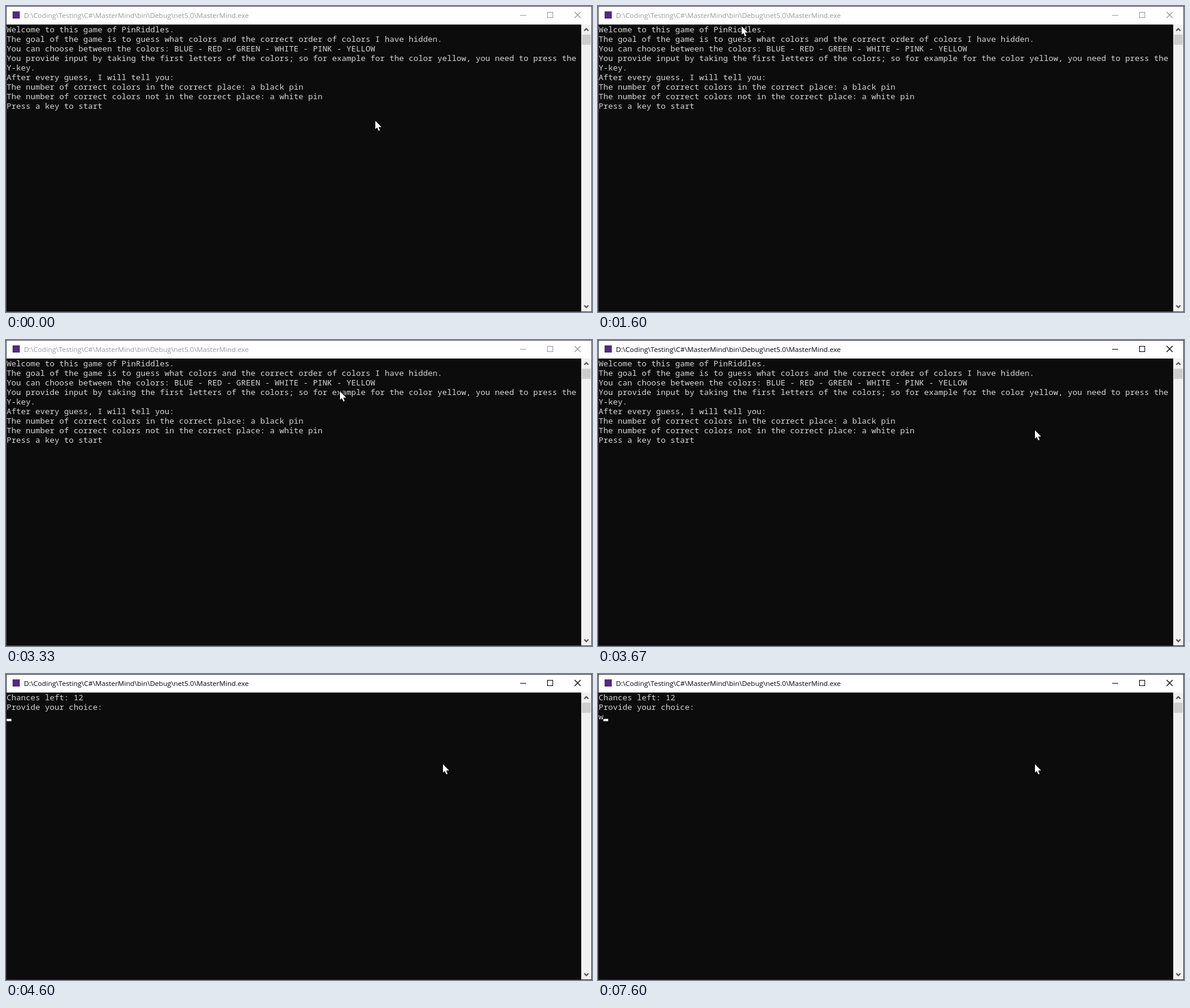
Animation, 979 px wide and 512 px high, one loop 8000 ms. Source, as an HTML page with a canvas:

```html
<!DOCTYPE html>
<html lang="en">
<head>
<meta charset="utf-8">
<title>Console game</title>
<style>
  html, body { margin: 0; width: 100%; height: 100%; overflow: hidden; background: #0c0c0c; }
  canvas { display: block; }
</style>
</head>
<body>
<canvas id="stage" width="979" height="512"></canvas>
<script>
const ctx = document.getElementById('stage').getContext('2d', { alpha: false });
const LOOP = 8000, FPS = 15;
const CELL_W = 8, CELL_H = 16, LEFT = 1, TOP = 31;

// Event times, in steps of 1/15 s
const FOCUS = 54, CARET_SHOWN = 63, KEY_PRESSED = 68, CLEARED = 69, TYPED = 114;
const FIRST_BLINK = 79, BLINK = 7.75;

const INTRO = [
  'Welcome to this game of PinRiddles.',
  'The goal of the game is to guess what colors and the correct order of colors I have hidden.',
  'You can choose between the colors: BLUE - RED - GREEN - WHITE - PINK - YELLOW',
  'You provide input by taking the first letters of the colors; so for example for the color yellow, you need to press the',
  'Y-key.',
  'After every guess, I will tell you:',
  'The number of correct colors in the correct place: a black pin',
  'The number of correct colors not in the correct place: a white pin',
  'Press a key to start'
];
const PROMPT = ['Chances left: 12', 'Provide your choice:'];
const PATH_TITLE = 'D:\\Coding\\Testing\\C#\\MasterMind\\bin\\Debug\\net5.0\\MasterMind.exe';

const linear = u => u;
const smooth = u => u * u * (3 - 2 * u);

// Mouse strokes along quadratic curves; the pointer rests in between
const STROKES = [
  { begin: 1, end: 4, from: [617, 192], bend: [400, 400], to: [62, 574], ease: linear },
  { begin: 13, end: 25, from: [61, 495], bend: [200, 180], to: [242, 28], ease: smooth },
  { begin: 26, end: 29, from: [242, 28], bend: [246, 80], to: [252, 121], ease: smooth },
  { begin: 40, end: 53, from: [252, 122], bend: [318, -29], to: [730, 151], ease: linear }
];

function mouseAt(step) {
  const { begin, end, from, bend, to, ease } =
    STROKES.filter(s => s.begin <= step).pop() || STROKES[0];
  const u = ease(Math.min(1, Math.max(0, (step - begin) / (end - begin))));
  return from.map((p, i) =>
    Math.round(p * (1 - u) ** 2 + 2 * bend[i] * u * (1 - u) + to[i] * u * u));
}

function rect(x, y, w, h, color) {
  ctx.fillStyle = color;
  ctx.fillRect(x, y, w, h);
}

function line(points, color, width) {
  ctx.beginPath();
  points.forEach(([x, y]) => ctx.lineTo(x, y));
  ctx.strokeStyle = color;
  ctx.lineWidth = width;
  ctx.stroke();
}

function chevron(y, rise) {
  line([[966, y + rise], [969.5, y], [973, y + rise]], '#505050', 2);
}

function drawWindow(titleColor, buttonColor, borderColor) {
  rect(0, 0, 979, 512, borderColor);
  rect(1, 1, 977, 30, '#fff');
  rect(1, TOP, 960, 480, '#0c0c0c');
  rect(11, 9, 12, 12, '#56297f');

  ctx.font = '11.6px "Open Sans", "Noto Sans", sans-serif';
  ctx.fillStyle = titleColor;
  ctx.fillText(PATH_TITLE, 30, 20);

  rect(859, 15, 10, 1, buttonColor);
  ctx.strokeStyle = buttonColor;
  ctx.lineWidth = 1;
  ctx.strokeRect(904.5, 10.5, 9, 9);
  line([[950, 10], [960, 20]], buttonColor, 1.2);
  line([[960, 10], [950, 20]], buttonColor, 1.2);

  rect(961, TOP, 17, 480, '#f0f0f0');
  rect(962, 48, 15, 17, '#cdcdcd');
  chevron(38, 3.5);
  chevron(504.5, -3.5);
}

function drawText(lines) {
  ctx.font = '13.3333px "Noto Sans Mono", "DejaVu Sans Mono", monospace';
  ctx.fillStyle = '#d6d6d6';
  lines.forEach((text, row) => ctx.fillText(text, LEFT, TOP + row * CELL_H + 13));
}

function drawCaret(col, row) {
  rect(LEFT + col * CELL_W, TOP + row * CELL_H + 12, CELL_W, 4, '#f2f2f2');
}

function drawConsole(step) {
  const typed = step >= TYPED;
  if (step < CLEARED) {
    drawText(INTRO);
    if (step >= CARET_SHOWN) drawCaret(0, INTRO.length + (step >= KEY_PRESSED ? 1 : 0));
    return;
  }
  drawText(typed ? [...PROMPT, 'w'] : PROMPT);
  const blinkOn = Math.floor((step - FIRST_BLINK) / BLINK) % 2 === 1;
  if (typed || step < FIRST_BLINK || blinkOn) drawCaret(typed ? 1 : 0, PROMPT.length);
}

function drawMouse([x, y]) {
  ctx.save();
  ctx.translate(x, y);
  const arrow = new Path2D('M0 0V14L3 11.2L5.6 17L7.8 16L5.4 10.4H10.4Z');
  ctx.strokeStyle = '#000';
  ctx.lineWidth = 2;
  ctx.stroke(arrow);
  ctx.fillStyle = '#fff';
  ctx.fill(arrow);
  ctx.restore();
}

function render(t) {
  // The small lead absorbs rounding at step boundaries
  const step = Math.floor((t + 4) * FPS / 1000);
  const focused = step >= FOCUS;
  const buttonColor = step > FOCUS ? '#000' : focused ? '#555' : '#999';
  drawWindow(focused ? '#000' : '#999', buttonColor, focused ? '#2b2b2b' : '#4a4a4a');
  drawConsole(step);
  drawMouse(mouseAt(step));
}

const start = performance.now();
function tick() {
  render((performance.now() - start) % LOOP);
  requestAnimationFrame(tick);
}
tick();
</script>
</body>
</html>
```
